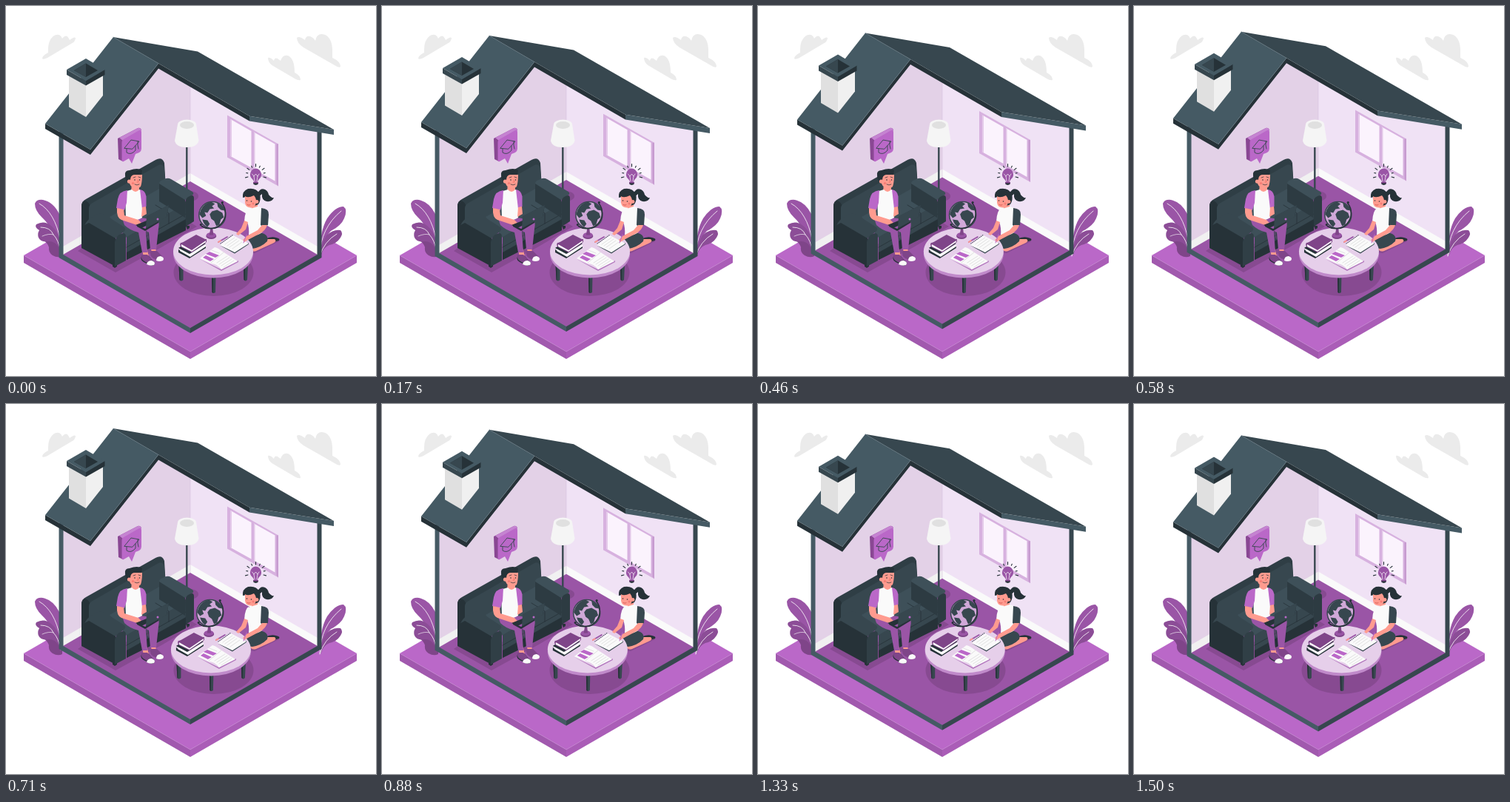
An HTML page for the animation above (1540 ms loop, 500 px wide and 500 px high).

```html
<!DOCTYPE html>
<html lang="en">
<head>
<meta charset="utf-8">
<title>Learning at home</title>
<style>
html, body { margin: 0; width: 100%; height: 100%; overflow: hidden; background: #fff; }
svg { display: block; width: 100vw; height: 100vh; }
.p { fill: #ba68c8 } .pd { fill: #9a55a6 } .pk { fill: #7f4589 } .sh { fill: #874a91 }
.k { fill: #263238 } .d { fill: #37474f } .m { fill: #455a64 }
.w { fill: #fafafa } .g { fill: #e0e0e0 } .skin { fill: #ff9b8f } .cloud { fill: #ebebeb }
.line { fill: none; stroke-linecap: round; stroke-linejoin: round }
</style>
</head>
<body>
<svg viewBox="0 0 500 500">
  <g class="cloud">
    <path d="M49 71Q49 67 57 63Q56 46 65 40Q73 36 76 44Q82 36 86 46Q92 41 94 43Q94 48 88 51L56 70Q50 73 49 71Z"/>
    <path d="M393 43Q396 40 404 46Q405 40 411 41Q416 43 418 47Q420 36 430 38.500Q440 42 441 58V70Q452 75 452 82Q450 84 444 80L402 56Q393 50 393 43Z"/>
    <path d="M354 70Q357 69 362 74Q363 69 367 71L371 74Q374 65 381 67Q390 71 390 90Q398 94 398 100Q395 101 390 98L361 81Q354 77 354 70Z"/>
  </g>

  <path class="p" d="M24 337L249 207L474 337L249 467Z"/>
  <path fill="#a159ae" d="M24 337L249 467V477L24 347Z"/>
  <path fill="#aa5db7" d="M474 337L249 467V477L474 347Z"/>
  <path class="line" stroke="#c583d1" stroke-width=".5" d="M24 337L249 467L474 337"/>

  <g id="leftPlant">
    <path class="pk" d="M48 314Q52 308 61 312L76 324V338Q70 341 63 337Q57 333 58 326Q57 321 48 314Z"/>
    <path class="pd" d="M74 334Q67 303 48 285Q39 276 39 267Q41 261 50 262Q64 265 72 281V326Z"/>
    <path fill="#8c4d97" d="M74 334Q70 318 58 318Q47 320 44 313Q42 308 45 303Q38 299 41 295Q52 289 61 297Q70 304 74 320Z"/>
    <g class="line" stroke="#fff" stroke-width=".8">
      <path d="M45 267Q66 279 73 315"/>
      <path d="M47 299Q60 299 64 309Q71 316 74 332"/>
      <path d="M49 311Q58 307 64 309" stroke-width=".6"/>
    </g>
  </g>
  <g id="rightPlant">
    <path class="pd" d="M424 337Q424 304 434 287Q445 271 456 271Q462 275 457 287Q453 297 439 304Q431 311 427 330Z"/>
    <path fill="#8c4d97" d="M424 338Q426 320 433 310Q443 301 452 303Q456 307 452 313Q447 321 437 323Q429 326 426 336Z"/>
    <g class="line" stroke="#fff" stroke-width=".8">
      <path d="M424 337Q425 300 453 277"/>
      <path d="M424 338Q430 318 447 308"/>
    </g>
  </g>

  <g id="house">
    <path fill="#e3d1e7" d="M77 175L114 196L206 80L249 104V238L77 337Z"/>
    <path fill="#f0e2f5" d="M249 104L329 151L421 168V337L249 238Z"/>
    <path fill="#f1f1f1" d="M249 226V238L77 337V325Z"/>
    <path class="w" d="M249 226V238L421 337V325Z"/>
    <path class="line" stroke="#d9c4de" stroke-width=".6" d="M249 105V237"/>
    <path class="pd" d="M249 237L421 336L249 435L77 336Z"/>

    <g id="window" transform="translate(0 .6)">
      <path fill="#d7b1df" d="M299 147L368 186V243L299 204Z"/>
      <path fill="#c79bd0" d="M365.500 186L368 186V243L365.500 240Z"/>
      <path fill="#fbf3fd" d="M303.500 152.500L331.500 168.500V218L303.500 202.500ZM335 170L363.500 186V236L335 220Z"/>
      <path fill="#e3c8e8" d="M303.500 152.500L305 153.500V203L303.500 202.500ZM335 170L336.500 171V220.500L335 220Z"/>
    </g>

    <path class="m" d="M71.500 170H77.500V336L249 435V442L71.500 340Z"/>
    <path class="d" d="M426.500 165H420.500V336L249 435V442L426.500 340Z"/>

    <path class="k" d="M53 159L114 194L206 77.500V84.500L114 201L53 166Z"/>
    <path class="m" d="M145 42L206 77.500L114 194L53 159Z"/>
    <path class="k" d="M206 77.500L329 148.700V155.500L206 84.500Z"/>
    <path class="m" d="M329 148.700L443 167V174L329 155.500Z"/>
    <path class="d" d="M145 42L259 61.500L443 167L329 148.700L206 77.500Z"/>
    <path class="line" stroke="#607580" stroke-width=".5" d="M145 42L206 77.500L114 194"/>

    <path class="g" d="M85 92L108 104V150L85 136.500Z"/>
    <path fill="#f0f0f0" d="M131 91L108 104V150L131 121Z"/>
    <path class="d" d="M82 86L108 101V107.500L82 93Z"/>
    <path class="k" d="M133.500 86L108 101V107.500L133.500 93Z"/>
    <path class="m" d="M82 86L108 71L133.500 86L108 101Z"/>
    <path class="k" d="M92 87L108 77.500L124 87L108 96Z"/>
    <path class="d" d="M92 87L108 77.500V96Z"/>
  </g>

  <g id="lamp">
    <ellipse class="sh" cx="248" cy="257" rx="12" ry="7"/>
    <path class="line" stroke="#37474f" stroke-width="2.400" d="M244.300 188V250"/>
    <path fill="#f5f5f5" d="M232 160L228 182Q230 191 244 191Q258 191 260.500 182L257 160Z"/>
    <ellipse fill="#f5f5f5" cx="244.500" cy="160" rx="12.500" ry="6.500"/>
    <ellipse class="g" cx="244.500" cy="161" rx="9.500" ry="5"/>
  </g>

  <g id="sofa">
    <path class="sh" d="M97 331L148 360L210 326L258 298L245 290L140 330L110 322Z"/>
    <path class="k" d="M144 348H150V352L147 354L144 352ZM243 297H248V300L245 302Z"/>
    <path fill="#2f3e45" d="M102 271Q102 264 108 261L202 208Q211 203 214 212L216 246L165 305L112 300L102 320Z"/>
    <path class="k" d="M102 270Q102 265 106 263Q113 264 114 273V296L102 304Z"/>
    <path class="d" d="M112 273Q112 269 117 266L206 215Q213 212 214 222L216 248L160 300L112 290Z"/>
    <path fill="#3e5059" d="M140 285L207 247L243 268L163 313Z"/>
    <path class="d" d="M163 312L243 267V303L163 343Z"/>
    <path class="line" stroke="#263238" stroke-width=".8" d="M163 326L243 281M202 269L220 280V294"/>
    <path class="k" d="M163 333L243 288V303L163 343Z"/>
    <path fill="#2d3b42" d="M207 239L242 261V286L207 264Z"/>
    <path fill="#3e5059" d="M207 240Q207 236 212 235Q218 231 223 234L252 251Q255 254 251 256L242 262Z"/>
    <path fill="#2d3b42" d="M242 265Q243 259 248 257Q254 254 254 260V291L243 298Z"/>
    <path class="k" d="M102 301Q105 291 113 291L148 312V352L102 327Z"/>
    <path class="d" d="M106 296Q112 285 124 281Q130 279 135 283L160 299Q163 302 159 305L148 314L112 293Z"/>
    <path fill="#303f46" d="M147 319Q148 311 155 308Q162 305 162 312V344L147 352Z"/>
  </g>

  <g id="bubble">
    <path fill="#894793" d="M151 179L178 165Q182 164 183 168L158 183V210L152 207Z"/>
    <path fill="#c583d1" d="M153 178L178 165Q182 164 183 168L158 182Z"/>
    <path class="p" d="M156.500 184Q156.500 181 159 180L180 168Q183 167 183 171V193Q183 196 180 198L175 200L170 213L166 206L159 210Q156.500 211 156.500 208Z"/>
    <path class="line" stroke="#37474f" stroke-width=".9" d="M160 192L169 181L180 183L171 193ZM163 193L163 198Q169 202 175 195L175 189M178 183L178 188L179 193"/>
  </g>

  <g id="boy">
    <path class="skin" d="M184 328L186 340L191 345L193 338L190 327ZM195 322L197 334L203 338L202 320Z"/>
    <path class="k" d="M184 337Q180 343 186 346L196 351Q201 351 201 347L192 337Z"/>
    <path class="pk" d="M184 336Q181 342 187 345L194 349L199 345L191 336Z"/>
    <path class="w" d="M190 349Q191 344 197 344Q203 346 200 350Q195 352 190 349Z"/>
    <path class="pk" d="M196 331Q193 337 199 341L207 344L211 338L204 331Z"/>
    <path class="w" d="M203 344Q203 338 209 338Q215 340 212 344Q207 346 203 344Z"/>
    <path class="pd" d="M157 287Q165 281 181 286L204 289Q208 292 206 301L203 329H195L193 306L189 304L191 333H184L179 306Q167 303 160 296Z"/>
    <path class="line" stroke="#7f4589" stroke-width=".8" d="M178 297L190 303L192 314"/>
    <path class="skin" d="M170 240H180V252Q175 257 169 251Z"/>
    <path class="w" d="M160 251L170 248Q175 254 180 248L185 250Q186 270 184 286Q173 293 162 288Q162 270 160 251Z"/>
    <path class="p" d="M181 248Q188 249 189.500 257V271L184 274Z"/>
    <path class="skin" d="M184 272L189 271L190 281L183 285Z"/>
    <path class="p" d="M164 249Q153 250 151 261L149 273L160 276L163 266Z"/>
    <path class="skin" d="M150 273L159 275L160 283L179 289L184 294L177 296L156 289Q149 286 150 273Z"/>
    <path class="k" d="M175 296L183 300L206 289L217 285L220 269L191 284L190 290Z"/>
    <path class="d" d="M190 284L220 269L217 285L189 301Z"/>
    <path class="k" d="M177 296L188 301L206 291V293L188 304L177 298Z"/>
    <circle class="p" cx="205" cy="288" r="1.500"/>
    <path class="skin" d="M165 230Q167 224 184 228Q184 238 182 244Q177 249 171 245Q165 241 165 230Z"/>
    <path class="k" d="M161 229Q160 222 167 222Q178 218 184 222L183 228L173 228Q168 229 168 235L165 237Q161 235 161 229Z"/>
    <circle class="skin" cx="166.500" cy="237" r="2.600"/>
    <circle fill="#f57c75" cx="171.500" cy="239.500" r="1.600"/>
    <circle class="k" cx="174" cy="235" r=".8"/><circle class="k" cx="180.500" cy="235" r=".8"/>
    <path class="line" stroke="#263238" stroke-width=".7" d="M172 232L175 231M179 231L182 232M174 241Q177 243 180 241"/>
    <path class="line" stroke="#e8665e" stroke-width=".7" d="M178 235L179 238H177"/>
  </g>

  <g id="girl">
    <path class="sh" d="M310 330L365 314L369 318L336 334Z"/>
    <path class="k" d="M350 315Q358 311 365 313Q371 314 369 317L361 319Z"/>
    <path class="skin" d="M333 326L352 315L363 315Q367 318 360 321L338 331Q332 333 330 328Z"/>
    <path class="d" d="M329 309Q339 303 349 308Q355 311 353 318Q345 326 333 328Q324 328 321 321Z"/>
    <path class="skin" d="M331 266H340V276L333 278Z"/>
    <path class="w" d="M327 275L340 271Q349 272 349 281L346 306Q338 312 328 309Q329 300 326 292Z"/>
    <path class="w" d="M328 274Q323 276 322 291L328 293Z"/>
    <path class="d" d="M345 273Q356 274 355 282L354 296Q348 300 344 296Z"/>
    <path class="k" d="M340 253Q344 245 350 248Q354 250 355 255Q359 260 362 259Q360 265 352 264Q345 262 346 254L341 258Z"/>
    <path class="k" d="M320 259Q319 250 327 247Q338 245 343 254Q345 262 341 268L336 270L324 258Z"/>
    <path class="skin" d="M323 257Q327 260 335 256Q338 259 338 264Q338 271 332 272.500Q324 273 323 266Z"/>
    <circle class="skin" cx="339" cy="264.500" r="2.400"/>
    <circle fill="#f57c75" cx="334" cy="267" r="1.500"/>
    <circle class="k" cx="325.500" cy="263" r=".8"/><circle class="k" cx="331.500" cy="264" r=".8"/>
    <path class="line" stroke="#c9473f" stroke-width=".7" d="M326 268.500Q328 270 330 268.800"/>
  </g>

  <g id="bulb">
    <path class="pd" d="M337.500 219.500A8.200 8.200 0 0 1 342 234Q340 236 340 238H335Q335 236 333 234A8.200 8.200 0 0 1 337.500 219.500Z"/>
    <path class="pk" d="M334 238H341V240H334Z"/>
    <path class="k" d="M334.500 239.500H340.500V241L337.500 242L334.500 241Z"/>
    <path class="line" stroke="#fff" stroke-width=".7" d="M336 237L335 230L332.500 227M339 237L340 230L342 227M335 230L337.500 227L340 230"/>
    <g id="rays" class="line" stroke="#263238" stroke-width="1.100"></g>
  </g>

  <ellipse class="sh" cx="280.500" cy="360" rx="54" ry="32"/>
  <g id="table">
    <path class="d" d="M233.500 350H239.500V370Q236.500 373 234.500 370ZM278 365H283.500L283 387Q280.500 389 278.500 387ZM321 350H327L326 370Q323.500 373 321.500 370Z"/>
    <path class="k" d="M233.500 350H235.500V371L234.500 370ZM278 365H280V388L278.500 387ZM321 350H323V371L321.500 370Z"/>
    <ellipse fill="#c08aca" cx="280" cy="335" rx="54" ry="32.500"/>
    <ellipse fill="#e6cfea" cx="280" cy="331.500" rx="54" ry="32"/>

    <g id="books">
      <path class="k" d="M233 329L248 338L270 324V327L248 341L233 333Z"/>
      <path class="w" d="M235 327L249 335L270 322V325L249 339L235 331Z"/>
      <path class="k" d="M233 327L253 314L270 321L248 335Z"/>
      <path class="pk" d="M236 320Q234 323 237 326L251 333L271 319V315Z"/>
      <path class="w" d="M237 322L251 330L270 317V319L251 332L237 325Z"/>
      <path class="pk" d="M236 321L257 309L271 316L251 329Z"/>
    </g>
    <g id="openBook">
      <path fill="#b47abf" d="M262 342L291 358L314 346V344L291 356Z"/>
      <path class="w" d="M262 341L282 326Q285 326 293 332L313 345L291 356Q285 348 277 348Z"/>
      <path class="line" stroke="#d8d8d8" stroke-width=".8" d="M277 347L294 333"/>
      <path class="p" d="M270 335L275 332L288 337L283 340ZM266 340L270 337L281 342L276 345Z"/>
      <path class="line" stroke="#d0d0d0" stroke-width=".6" d="M278 330L288 334M285 347L299 338M288 349L302 340M291 351L305 342M294 353L308 344"/>
    </g>
    <g id="notepad">
      <path class="d" d="M289 323.500L309 334.500L328 322V320L309 332Z"/>
      <path class="w" d="M289 323L307 310L328 321L309 333Z"/>
      <path class="line" stroke="#37474f" stroke-width="1.100" stroke-dasharray=".4 2" d="M290 321L307 309"/>
      <path class="line" stroke="#d0d0d0" stroke-width=".6" d="M296 322L309 313M299 324L312 315M302 326L315 317M306 328L319 319"/>
    </g>
    <path class="line" stroke="#9a55a6" stroke-width="1.800" d="M287 319L299 312"/>
    <path class="line" stroke="#ff9b8f" stroke-width="1.800" d="M287 319L290 317.200"/>

    <g id="globe" transform="translate(1.300 .5)">
      <ellipse class="pk" cx="276" cy="310.500" rx="7" ry="4"/>
      <ellipse class="pd" cx="276" cy="309" rx="6.500" ry="3.500"/>
      <path class="pk" d="M275 300H278L279 309H273.500Z"/>
      <circle fill="#d0a8d8" cx="277.500" cy="282" r="18"/>
      <path class="d" d="M262 275Q266 266 276 264L281 267L277 270L280 273L274 274L271 279L267 278L269 283L264 286L260 281ZM284 265L292 271L294 276L289 275L285 271ZM277 277L284 275L291 279L293 285L289 288L287 295L283 297L280 290L276 287L274 281ZM264 288L271 289L274 294L271 298Q266 295 264 288Z"/>
      <circle fill="none" stroke="#37474f" stroke-width="1.500" cx="277.500" cy="282" r="18"/>
      <path class="line" stroke="#263238" stroke-width="1.600" d="M290.500 266A21 21 0 0 1 263 297"/>
      <circle class="k" cx="291" cy="265" r="1.600"/>
      <circle class="k" cx="262" cy="295" r="1.500"/>
    </g>
  </g>

  <g id="girlArms">
    <path class="skin" d="M322 290L327 292L324 302L314 310L311 308L318 300Z"/>
    <path class="skin" d="M346 296L353 296Q351 303 344 307L327 316L322 319L320 316L325 311L340 303Z"/>
    <path class="line" stroke="#ba68c8" stroke-width="1" d="M321 320L325 309"/>
  </g>
</svg>
<script>
const LOOP = 1540;
const byId = id => document.getElementById(id);
const house = byId("house"), table = byId("table");

// [ms, offset in px]
const lift = [[0, 0], [290, -3.3], [460, -5.5], [740, -9.4], [1080, -4.5], [1330, -1.3], [1500, 0.5], [LOOP, 0]];
const slide = [[0, 0], [300, 1.8], [460, -2.2], [620, -3.3], [710, -3.1], [1080, -1.1], [1330, -0.3], [1500, 0.4], [LOOP, 0]];

function at(keys, t) {
  const i = keys.findIndex(k => k[0] > t);
  const [t0, v0] = keys[i - 1], [t1, v1] = keys[i];
  return v0 + (v1 - v0) * (t - t0) / (t1 - t0);
}

function drawRays() {
  let d = "";
  for (let i = -4; i <= 4; i++) {
    const a = i * 0.46 - Math.PI / 2;
    const r = i % 2 ? 13 : 14.5;
    const point = q => `${337.5 + q * Math.cos(a)} ${228 + q * Math.sin(a)}`;
    d += `M${point(11)}L${point(r)}`;
  }
  byId("rays").innerHTML = `<path d="${d}"/>`;
}

function render(ms) {
  const t = ms % LOOP;
  house.setAttribute("transform", `translate(0 ${at(lift, t)})`);
  table.setAttribute("transform", `translate(${at(slide, t)} 0)`);
}

drawRays();
const start = performance.now();
function tick() {
  render(performance.now() - start);
  requestAnimationFrame(tick);
}
tick();
</script>
</body>
</html>
```
